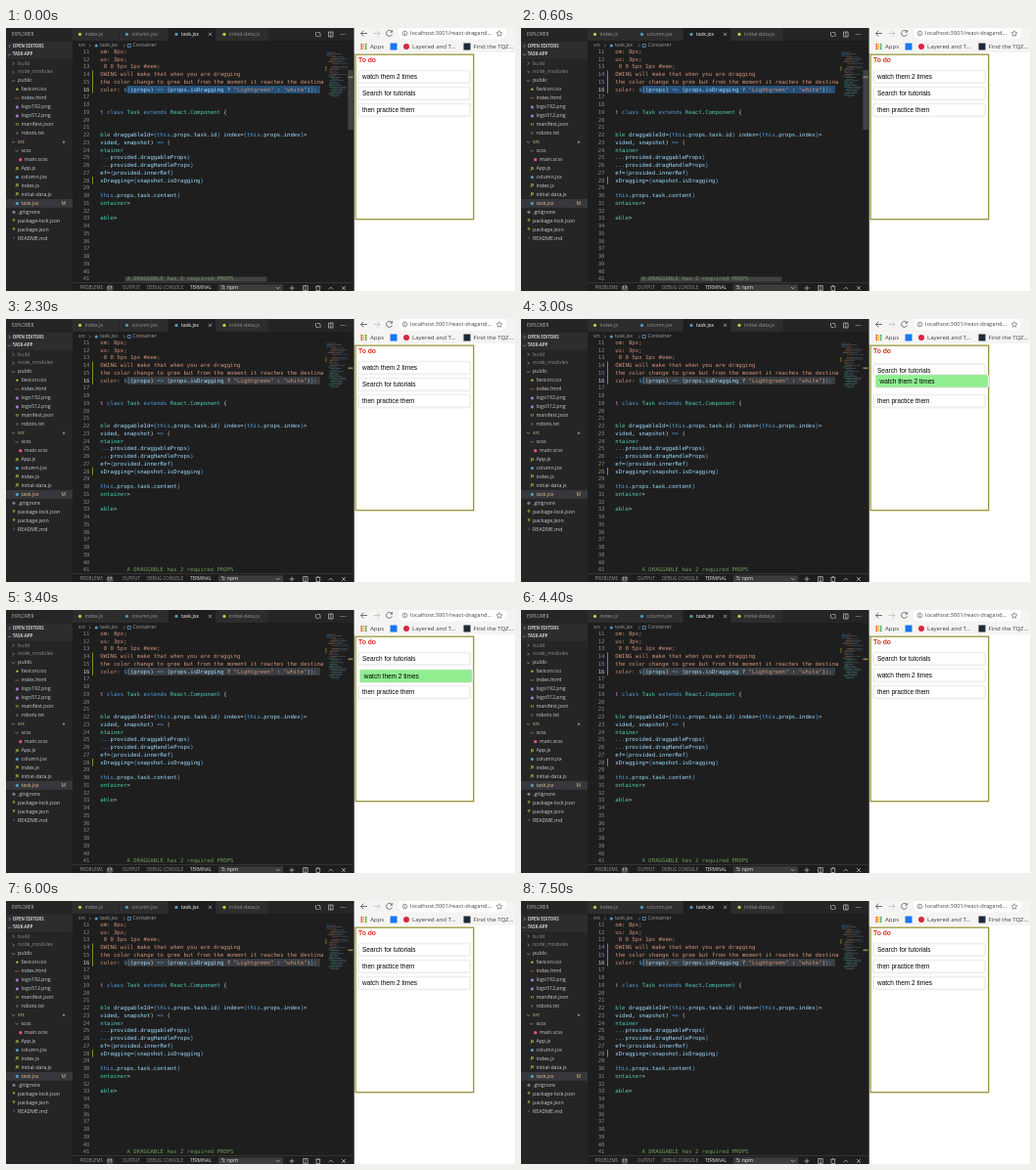
Animation of 520x269 px, one loop 7600 ms. Source, as an HTML page:

```html
<!DOCTYPE html>
<html lang="en">
<head>
<meta charset="utf-8">
<title>Drag and drop task list</title>
<style>
  html, body { margin: 0; width: 100%; height: 100%; overflow: hidden; background: #1e1e1e; }
  svg { display: block; width: 520px; height: 269px; }
  text { white-space: pre; }
  .ui { font-family: "Open Sans", sans-serif; }
  .mono { font-family: "DejaVu Sans Mono", monospace; }
  .page { font-family: "Liberation Sans", sans-serif; }
</style>
</head>
<body>
<svg id="stage" viewBox="0 0 520 269"></svg>
<script>
const LOOP = 7600;
const stage = document.getElementById('stage');

function add(tag, attrs, parent = stage) {
  const el = document.createElementNS('http://www.w3.org/2000/svg', tag);
  for (const name in attrs) el.setAttribute(name, attrs[name]);
  return parent.appendChild(el);
}
const rect = (x, y, width, height, fill, more, parent) =>
  add('rect', { x, y, width, height, fill, ...more }, parent);
const dot = (cx, cy, r, fill) => add('circle', { cx, cy, r, fill });
const line = (d, stroke = '#c5c5c5', width = 0.7) =>
  add('path', { d, stroke, 'stroke-width': width, fill: 'none' });
// Text is placed by its vertical middle, with the baseline on a whole pixel.
function text(x, y, size, fill, content, more, parent) {
  const baseline = Math.floor(y + size * 0.35);
  const el = add('text', { x, y: baseline, 'font-size': size, fill, class: 'ui', ...more }, parent);
  el.textContent = content;
  return el;
}

/* ---- Code editor ---- */
const lineY = n => 24.5 + 7.75 * (n - 11);
const CODE_X = 96.3, CODE_SIZE = 5.67, CHAR = CODE_SIZE * 0.602;
const INK = { o: '#ce9178', b: '#569cd6', t: '#4ec9b0', v: '#9cdcfe', w: '#d4d4d4', g: '#6a9955', p: '#c586c0' };

rect(68, 0, 287, 269, '#1e1e1e');
const selection = rect(CODE_X + 8 * CHAR, lineY(16) - 4.2, 57.8 * CHAR, 7.8, '#264f78');

// Each run starts with its colour key.
const code = {
  11: 'oom: 8px;',
  12: 'ous: 3px;',
  13: 'o 0 0 5px 1px #eee;',
  14: 'oOWING will make that when you are dragging',
  15: 'othe color change to gree but from the moment it reaches the destina',
  16: 'ocolor: |b${|w(|vprops|w) |b=>|w (|vprops|w.|visDragging|w ? |o"Lightgreen"|w : |o"white"|w)|b}|o;',
  19: 'pt |bclass |tTask |bextends |tReact|w.|tComponent|w {',
  22: 'tble |vdraggableId|w=|b{this|w.|vprops|w.|vtask|w.|vid|b} |vindex|w=|b{this|w.|vprops|w.|vindex|b}|w>',
  23: 'vvided|w, |vsnapshot|w) |b=>|w (',
  24: 'tntainer',
  25: 'b...|vprovided|w.|vdraggableProps|b}',
  26: 'b...|vprovided|w.|vdragHandleProps|b}',
  27: 'vef|w=|b{|vprovided|w.|vinnerRef|b}',
  28: 'vsDragging|w=|b{|vsnapshot|w.|visDragging|b}',
  30: 'bthis|w.|vprops|w.|vtask|w.|vcontent|b}',
  31: 'tontainer|w>',
  33: 'table|w>',
  41: 'g        A DRAGGABLE has 2 required PROPS'
};
for (let n = 11; n <= 41; n++) {
  text(85.5, lineY(n), CODE_SIZE, n === 16 ? '#c6c6c6' : '#858585', n, { class: 'mono', 'text-anchor': 'end' });
  if (!code[n]) continue;
  const row = text(CODE_X, lineY(n), CODE_SIZE, INK.w, '', { class: 'mono' });
  for (const run of code[n].split('|'))
    add('tspan', { fill: INK[run[0]] }, row).textContent = run.slice(1);
}
rect(88, 43.5, 1, 23.2, '#7d8f1c');
rect(88, 151.9, 1, 7.8, '#7d8f1c');

// Minimap
rect(326, 22, 29, 238, '#1e1e1e');
let seed = 7;
const random = () => (seed = seed * 16807 % 2147483647) / 2147483647;
for (let y = 23; y < 70; y += 1.6) {
  if (random() < 0.16) continue;
  const indent = y < 29 ? 0 : 1 + random() * 5;
  const width = 5 + random() * 15;
  const inks = y < 29 ? ['#4f8fc4', '#b07b62'] : y < 48 ? ['#a8745e', '#5e7ea0'] : ['#4aa594', '#7097b0'];
  rect(327.5 + indent, y, width * 0.45, 0.8, inks[0], { opacity: 0.5 });
  rect(328 + indent + width * 0.45, y, width * 0.5, 0.8, inks[1], { opacity: 0.4 });
}
rect(326.5, 39, 0.8, 5, '#7d8f1c');
rect(349.5, 49.5, 5, 1.6, '#8b8b45');
const scrollbars = add('g', {});
rect(349.3, 43, 5.7, 61, '#797979', { opacity: 0.4 }, scrollbars);
rect(121.5, 254.5, 145, 5, '#797979', { opacity: 0.4 }, scrollbars);

// Tabs
rect(68, 0, 287, 13, '#252526');
[[68, 47], [115.5, 50], [214.5, 53]].forEach(([x, w]) => rect(x, 0, w, 13, '#2d2d2d'));
rect(166, 0, 48, 13, '#1e1e1e');
const tab = (x, name, icon, fill) => {
  dot(x - 5, 6.4, 1.6, icon);
  text(x, 6.4, 5.25, fill, name);
};
tab(80.5, 'index.js', '#cbcb41', '#969696');
tab(128.5, 'column.jsx', '#519aba', '#969696');
tab(179, 'task.jsx', '#519aba', '#fff');
tab(228, 'initial-data.js', '#cbcb41', '#969696');
line('M207 4.8l3.2 3.2m0-3.2l-3.2 3.2');
line('M316.5 4v3.5a1 1 0 0 0 1 1h2M321 9V5.5a1 1 0 0 0-1-1h-2');
line('M329.5 4h4.6v5h-4.6zM331.8 4v5');
[342.5, 344.7, 346.9].forEach(x => dot(x, 6.5, 0.55, '#c5c5c5'));

// Breadcrumbs
rect(68, 13, 287, 8.3, '#1e1e1e');
text(74, 18, 5.25, '#a0a0a0', 'src');
line('M85 16.5l1.5 1.5l-1.5 1.5M120 16.5l1.5 1.5l-1.5 1.5', '#a0a0a0', 0.5);
dot(92.3, 18, 1.6, '#519aba');
text(96, 18, 5.25, '#a0a0a0', 'task.jsx');
line('M124.3 16.5h3v3h-3z', '#75beff', 0.6);
text(129.5, 18, 5.25, '#a0a0a0', 'Container');

// Bottom panel
rect(68, 260, 287, 9, '#1e1e1e');
rect(68, 260, 287, 0.5, '#4a4a4a');
const panelTab = (x, name, fill = '#969696') => text(x, 266, 4.55, fill, name);
panelTab(75.5, 'PROBLEMS');
dot(106, 266, 3.6, '#4d4d4d');
text(106, 266, 4.2, '#fff', '17', { 'text-anchor': 'middle' });
panelTab(119, 'OUTPUT');
panelTab(144, 'DEBUG CONSOLE');
panelTab(188, 'TERMINAL', '#e7e7e7');
rect(217, 262.3, 66, 6.7, '#3c3c3c');
text(220, 266, 5.25, '#f0f0f0', '5: npm');
line('M276 265l1.8 1.8l1.8-1.8');
line('M289.5 266h5m-2.5-2.5v5');
line('M303.5 263.6h4.8v4.8h-4.8zM305.9 263.6v4.8');
line('M316.3 264.3h5M317 264.3v4.2h3.6v-4.2M318 263.5h1.6');
line('M329.5 267.3l2.3-2.3l2.3 2.3');
line('M343 264l4 4m0-4l-4 4');

/* ---- File explorer ---- */
rect(0, 0, 68, 269, '#252526');
text(6, 6.5, 4.65, '#bbb', 'EXPLORER');
rect(0, 14, 68, 8.8, '#2d2d2f');
rect(0, 23, 68, 8.8, '#2d2d2f');
const chevron = (x, y, open) =>
  line(open ? `M${x - 1.5} ${y - 0.8}l1.5 1.5l1.5-1.5` : `M${x - 0.7} ${y - 1.5}l1.5 1.5l-1.5 1.5`, '#c5c5c5', 0.55);
[[18.5, 'OPEN EDITORS', false], [27.3, 'TASK-APP', true]].forEach(([y, name, open]) => {
  chevron(3.5, y, open);
  text(6.8, y, 4.4, '#ccc', name, { 'font-weight': 700 });
});

const YELLOW = '#cbcb41', BLUE = '#519aba', PURPLE = '#a074c4';
// Depth, name, icon: '>' closed folder, 'v' open folder, a colour, or a glyph with its colour.
const files = [
  [0, 'build', '>'], [0, 'node_modules', '>'], [0, 'public', 'v'],
  [1, 'favicon.ico', YELLOW, '★'], [1, 'index.html', '#e37933', '<>'],
  [1, 'logo192.png', PURPLE], [1, 'logo512.png', PURPLE],
  [1, 'manifest.json', YELLOW, '{}'], [1, 'robots.txt', '#c5c5c5', '≡'],
  [0, 'src', 'v'], [1, 'scss', 'v'], [2, 'main.scss', '#f55385'],
  [1, 'App.js', YELLOW, 'JS'], [1, 'column.jsx', BLUE], [1, 'index.js', YELLOW, 'JS'],
  [1, 'initial-data.js', YELLOW, 'JS'], [1, 'task.jsx', BLUE],
  [0, '.gitignore', '#6d8086'], [0, 'package-lock.json', YELLOW, '{}'],
  [0, 'package.json', YELLOW, '{}'], [0, 'README.md', BLUE, 'i']
];
files.forEach(([depth, name, icon, glyph], i) => {
  const y = 36.2 + 8.95 * i, x = 12 + 3.4 * depth;
  const changed = name === 'src' || name === 'task.jsx';
  if (name === 'task.jsx') rect(0, y - 4.4, 68, 8.8, '#37373d');
  if (icon === '>' || icon === 'v') chevron(x - 4.5, y, icon === 'v');
  else if (glyph) text(x - 4, y, 4, icon, glyph, { 'text-anchor': 'middle', 'font-weight': 700 });
  else dot(x - 4, y, 1.6, icon);
  text(x, y, 5.25, changed ? '#e2c08d' : i < 2 ? '#8c8c8c' : '#ccc', name);
});
dot(59, 116.7, 1.2, '#8f7d5f');
text(56.5, 179.4, 5, '#e2c08d', 'M');

/* ---- Browser ---- */
rect(354.8, 0, 1.2, 269, '#2b2b2b');
rect(355.8, 0, 164.2, 269, '#fff');
rect(355.8, 0, 164.2, 25, '#f5f4f2');
line('M369 5.5h-6.5m2.8-2.8l-2.8 2.8l2.8 2.8', '#5f6368', 0.9);
line('M375.5 5.5h6.5m-2.8-2.8l2.8 2.8l-2.8 2.8', '#c3c5c8', 0.9);
line('M394 3.6a3 3 0 1 0 .4 2.8M394.6 2.2v2h-2', '#5f6368', 0.9);
rect(401, -3, 110, 14.5, '#fff', { rx: 7 });
add('circle', { cx: 407.5, cy: 5.5, r: 2.3, fill: 'none', stroke: '#5f6368', 'stroke-width': 0.7 });
line('M407.5 5.1v1.8M407.5 3.8v.7', '#5f6368');
text(413, 5.5, 5.75, '#3c4043', 'localhost:3001/react-dragand...');
line('M504 2.6l.9 2l2.1.2l-1.6 1.4l.5 2.1l-1.9-1.1l-1.9 1.1l.5-2.1l-1.6-1.4l2.1-.2z', '#5f6368', 0.6);

const gridInk = ['#ea4335', '#fbbc04', '#34a853', '#4285f4'];
for (let i = 0; i < 9; i++)
  rect(362.5 + i % 3 * 2.2, 16 + Math.floor(i / 3) * 2.2, 1.6, 1.6, gridInk[(i + Math.floor(i / 3)) % 4]);
text(372, 19, 6.1, '#3c4043', 'Apps');
rect(392.5, 15.5, 7, 7, '#1877f2');
dot(409, 19, 3, '#d7263d');
text(415, 19, 6.1, '#3c4043', 'Layered and T...');
rect(467.5, 15.5, 7, 7, '#1f2a37');
text(477.5, 19, 6.1, '#3c4043', 'Find the TQZ...');

/* ---- Task column ---- */
rect(357.1, 27.1, 120.6, 168.6, '#fff', { stroke: '#96943a', 'stroke-width': 1.3 });
text(360, 33.6, 6.8, '#dc2f1f', 'To do', { class: 'page', 'font-weight': 700 });

const SLOT = 17;
function makeCard(label) {
  const group = add('g', {});
  rect(359.4, 43, 115.4, 13.8, 'none', { rx: 1.8, stroke: '#f3f3f3', 'stroke-width': 1.2 }, group);
  const box = rect(360.2, 43.8, 113.8, 12.2, '#fff', { rx: 1.2, stroke: '#dcdcdc', 'stroke-width': 0.6 }, group);
  text(364, 49.9, 6.5, '#000', label, { class: 'page' }, group);
  return { group, box };
}
const search = makeCard('Search for tutorials');
const watch = makeCard('watch them 2 times');
const practice = makeCard('then practice them');

// Eased interpolation through [time, value] points.
function track(t, points) {
  let [t0, v0] = points[0];
  for (const [t1, v1] of points) {
    if (t < t1) {
      const p = Math.max(0, (t - t0) / (t1 - t0 || 1));
      return v0 + (v1 - v0) * p * p * (3 - 2 * p);
    }
    [t0, v0] = [t1, v1];
  }
  return v0;
}
function place(card, x, slot, dragging) {
  card.group.setAttribute('transform', `translate(${x} ${slot * SLOT})`);
  card.box.setAttribute('fill', dragging ? '#90ee90' : '#fff');
  card.box.setAttribute('stroke', dragging ? '#8be08b' : '#dcdcdc');
}

function draw(t) {
  selection.setAttribute('fill', t < 2100 ? '#264f78' : '#3a3d41');
  scrollbars.setAttribute('opacity', track(t, [[1700, 1], [2250, 0]]));

  place(search, 0, track(t, [[2850, 1], [3050, 0]]), false);
  place(watch,
    track(t, [[2450, 0], [3000, 2.5], [3400, 1.8], [3850, 1.8], [4100, 0]]),
    track(t, [[2450, 0], [3250, 1.04], [3850, 1.04], [4100, 1], [4800, 1], [5000, 2]]),
    t >= 2450 && t < 4100);
  place(practice,
    track(t, [[4550, 0], [4800, 1], [5080, 0.2], [5300, 0.2], [5500, 0]]),
    track(t, [[4550, 2], [5080, 1], [5500, 1]]),
    t >= 4550 && t < 5500);

  const dragged = t < 4300 ? watch : practice;
  if (stage.lastChild !== dragged.group) stage.appendChild(dragged.group);
}

const start = performance.now();
function tick(now) {
  draw(Math.max(0, now - start) % LOOP);
  requestAnimationFrame(tick);
}
draw(0);
requestAnimationFrame(tick);
</script>
</body>
</html>
```
